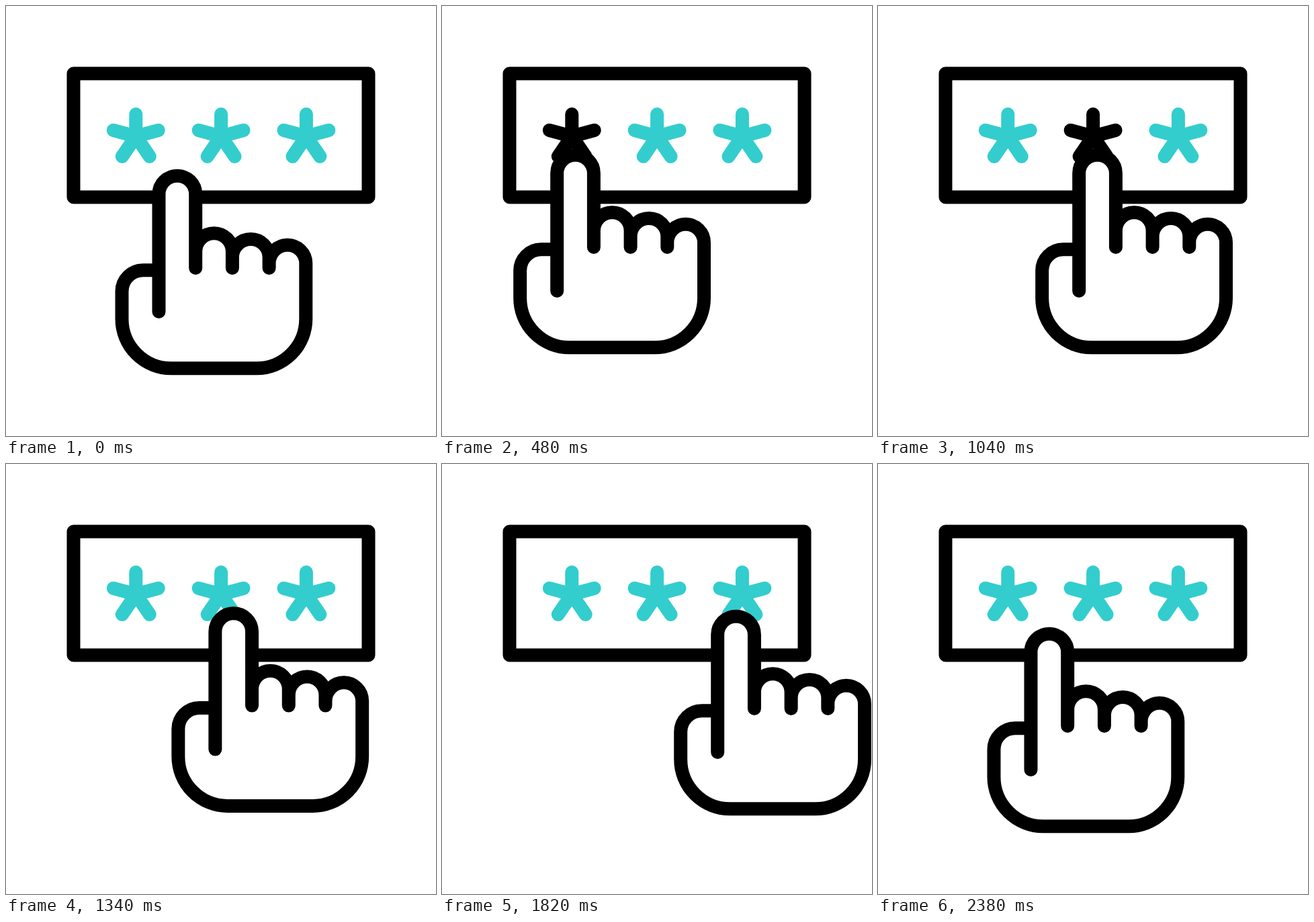
Recreate the animation shown at these times as an HTML page with a canvas. Size 640x640 px, loop 2400 ms.

```html
<!DOCTYPE html>
<html lang="en">
<head>
<meta charset="utf-8">
<title>Passcode entry</title>
<style>
  html, body { margin: 0; height: 100%; overflow: hidden; background: #fff; }
  canvas { display: block; width: 100vw; height: 100vh; }
</style>
</head>
<body>
<canvas width="640" height="640"></canvas>
<script>
const ctx = document.querySelector('canvas').getContext('2d');
const LOOP = 2400, STEP = 20;
const MOVE_TIME = 280, MOVE_GAP = 540, PRESS_GAP = 560;
const EXIT = 1800, ENTER = 2060;
const PITCH = 54.7; // finger width, centre to centre

const stops = [{ x: 0, y: 0 }, { x: -56.3, y: -31 }, { x: 71.7, y: -31 }, { x: 174.7, y: -26 }];

const progress = (t, start, duration) => {
  const u = Math.min(1, Math.max(0, (t - start) / duration));
  return u * u * (3 - 2 * u);
};

function handOffset(t) {
  if (t >= ENTER) {
    const left = 1 - progress(t, ENTER, 320);
    return { x: -465 * left, y: 71.6 * left };
  }
  const i = Math.min(2, Math.max(0, Math.floor((t - 200) / MOVE_GAP)));
  const k = progress(t, 200 + MOVE_GAP * i, MOVE_TIME);
  const from = stops[i], to = stops[i + 1];
  return {
    x: from.x + (to.x - from.x) * k + 407 * progress(t, EXIT, 240),
    y: from.y + (to.y - from.y) * k
  };
}

function pressedStar(t) {
  const i = Math.floor((t - 480) / PRESS_GAP);
  const release = Math.min(760 + MOVE_GAP * i, EXIT + STEP);
  return t < release ? i : -1;
}

function drawStar(x, color) {
  ctx.strokeStyle = color;
  ctx.beginPath();
  for (const [dx, y] of [[0, 161], [-33.5, 185], [33.5, 185], [-20.5, 224], [20.5, 224]]) {
    ctx.moveTo(x, 194);
    ctx.lineTo(x + dx, y);
  }
  ctx.stroke();
}

function drawHand({ x, y }) {
  const left = 172.5, right = 227.5 + 4 * PITCH, bottom = 539.3;
  ctx.save();
  ctx.translate(x, y);
  ctx.beginPath();
  ctx.moveTo(227.5, 455);
  // Index finger, then three knuckles, each a little lower.
  for (let i = 0; i < 4; i++) {
    const top = i ? 356.7 + 8.8 * i : 280;
    ctx.arc(227.5 + PITCH * (i + 0.5), top, PITCH / 2, Math.PI, 0);
    if (i < 3) ctx.lineTo(227.5 + PITCH * (i + 1), 390);
  }
  ctx.arcTo(right, bottom, 300, bottom, 73.5);
  ctx.arcTo(left, bottom, left, 430, 73.5);
  ctx.arcTo(left, 393.3, 220, 393.3, 31.5);
  ctx.lineTo(227.5, 393.3);
  ctx.fill();
  ctx.strokeStyle = '#000';
  ctx.stroke();
  ctx.restore();
}

function draw(now) {
  const t = Math.floor(now % LOOP / STEP) * STEP;
  const pressed = pressedStar(t);
  ctx.clearRect(0, 0, 640, 640);
  ctx.lineWidth = 20;
  ctx.lineCap = ctx.lineJoin = 'round';
  ctx.fillStyle = '#fff';
  ctx.strokeStyle = '#000';
  ctx.strokeRect(100.5, 100.5, 439, 184);
  for (let i = 0; i < 3; i++) {
    drawStar(193.3 + 126.8 * i, i === pressed ? '#000' : '#33cdcd');
  }
  drawHand(handOffset(t));
}

let origin;
function tick(now) {
  origin ??= now;
  draw(now - origin);
  requestAnimationFrame(tick);
}
draw(0);
requestAnimationFrame(tick);
</script>
</body>
</html>
```
